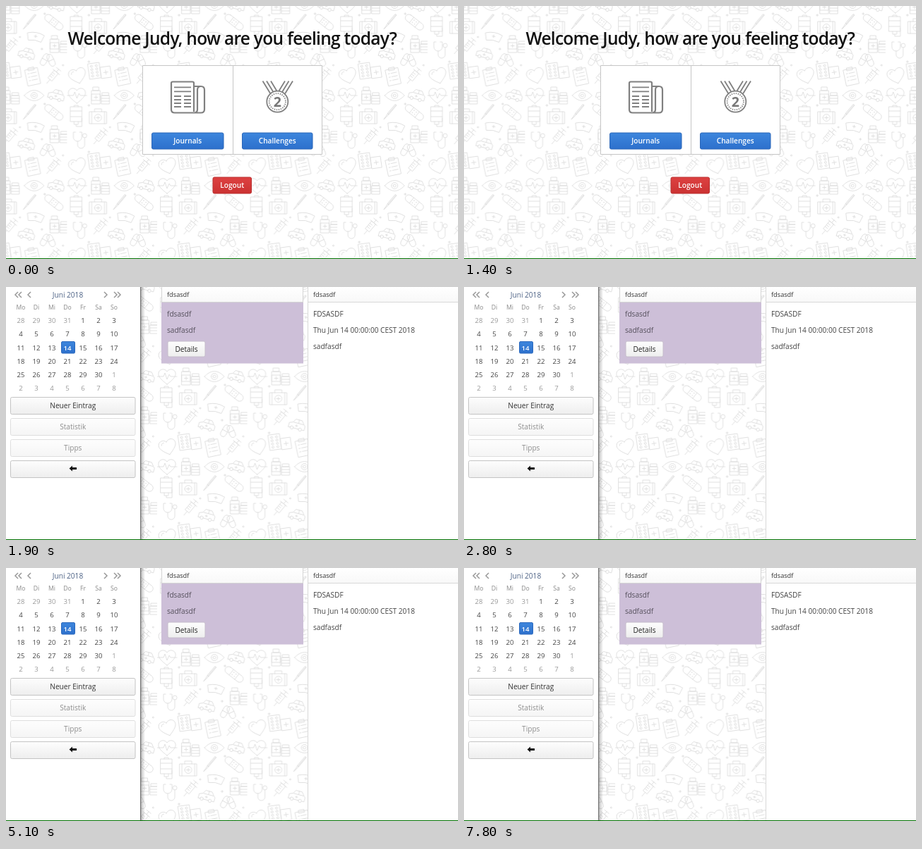
Write an HTML page that moves like this. It is 640 by 359 pixels and loops after 8100 ms.

```html
<!DOCTYPE html>
<html lang="en">
<head>
<meta charset="utf-8">
<title>Health journal</title>
<style>
html, body { margin: 0; width: 100%; height: 100%; overflow: hidden; background: #fff; }
svg { display: block; width: 640px; height: 359px; }
text { font: 10.1px "Open Sans", "Noto Sans", sans-serif; fill: #444; }
.mid { text-anchor: middle; }
.bold { font-weight: 600; }
.line { fill: none; stroke: #dadada; stroke-width: .8; stroke-linejoin: round; stroke-linecap: round; }
.icon { fill: none; stroke: #808080; stroke-width: 2.2; stroke-linejoin: round; }
.thin { stroke-width: 1.8; }
.nav { fill: none; stroke: #999; stroke-width: 1.5; }
</style>
</head>
<body>
<svg viewBox="0 0 640 359">
  <defs>
    <linearGradient id="blue" x2="0" y2="1"><stop stop-color="#3d86dd"/><stop offset="1" stop-color="#2d70cc"/></linearGradient>
    <linearGradient id="lit" x2="0" y2="1"><stop stop-color="#448de2"/><stop offset="1" stop-color="#3477d2"/></linearGradient>
    <linearGradient id="red" x2="0" y2="1"><stop stop-color="#dd4141"/><stop offset="1" stop-color="#cb3232"/></linearGradient>
    <linearGradient id="grey" x2="0" y2="1"><stop stop-color="#fdfdfd"/><stop offset="1" stop-color="#eee"/></linearGradient>
    <linearGradient id="bar" x2="0" y2="1"><stop stop-color="#fff"/><stop offset="1" stop-color="#f8f8f8"/></linearGradient>
    <linearGradient id="shade"><stop stop-color="#000" stop-opacity=".55"/><stop offset=".3" stop-color="#000" stop-opacity=".2"/><stop offset="1" stop-color="#000" stop-opacity="0"/></linearGradient>
    <pattern id="tile" x="214" y="114" width="127.6" height="128" patternUnits="userSpaceOnUse">
      <g id="doodles" class="line" transform="translate(14 13)"></g>
    </pattern>
  </defs>
  <rect width="640" height="358" fill="url(#tile)"/>

  <g id="welcome">
    <text class="mid bold" x="320.3" y="54.5" style="font-size:24.5px;letter-spacing:-.71px;fill:#111">Welcome Judy, how are you feeling today?</text>
    <path d="M193.5 84.5h254v126h-254zM321.5 84.5v126" fill="#fff" stroke="#c6c6c6"/>
    <g class="icon">
      <path d="M266 150V109.5q0-2-2-2H236q-2 0-2 2V147q0 4.5 5 4.5H276q5 0 5-5V119q0-5-5-5t-5 5v28q0 4-4 4.5M266 114h10"/>
      <path class="thin" d="M238 115.3h24M238 121.3h24M238 128h10M252 128h10M238 133h10M252 133h10M238 138h10M252 138h10M238 143h10M252 143h10"/>
    </g>
    <g class="icon thin">
      <path d="M363.5 106.5l11 18M369 106.5l11 18M375 106.5l9 15M406 106.5l-11 18M400.5 106.5l-11 18M395 106.5l-11 18"/>
      <circle cx="384.3" cy="135.7" r="15" fill="#fff"/>
      <circle cx="384.3" cy="135.7" r="11.6" stroke-dasharray="1.4 1.64"/>
    </g>
    <text class="mid" x="384.3" y="142.7" style="font-size:19.5px;font-weight:700;fill:#777">2</text>
    <g id="actions"></g>
    <g id="focus"></g>
  </g>

  <g id="journal">
    <rect x="190" width="7" height="358" fill="url(#shade)"/>
    <path d="M0 0h190v358H0z" fill="#fff"/>
    <path d="M190.5 0v358" stroke="#777"/>
    <path class="nav" d="M17 7l-4 4 4 4M22 7l-4 4 4 4M35 7l-4 4 4 4M139 7l4 4-4 4M153 7l4 4-4 4M158 7l4 4-4 4"/>
    <text class="mid" x="87.5" y="14.5" style="fill:#4d6285">Juni 2018</text>
    <g id="calendar"></g>
    <g id="menu"></g>
    <path d="M89.5 257.5l4.5-4v2.6h6v2.8h-6v2.6z" fill="#111"/>

    <path d="M220 0h201v21.5H220z" fill="url(#bar)"/>
    <path d="M220 22h201v86.5H220z" fill="#cdbfd8"/>
    <path d="M220 21.5h201M220.5 0v22M420.5 0v22" stroke="#d4d4d4"/>
    <path d="M428 0h212v358H428z" fill="#fff"/>
    <path d="M428 0h212v21.5H428z" fill="url(#bar)"/>
    <path d="M428 21.5h212M427.5 0v358" stroke="#d8d8d8"/>
    <g id="entry"></g>
  </g>
  <path d="M0 358h640v1H0z" fill="#007000"/>
</svg>
<script>
const $ = id => document.getElementById(id);
const label = (x, y, s, fill = '#444', more = '', cls = '') =>
  `<text class="${cls}" x="${x}" y="${y}" style="fill:${fill};${more}">${s}</text>`;
const button = (x, y, w, h, s, paint, edge, ink, more = '') =>
  `<rect x="${x + .5}" y="${y + .5}" width="${w - 1}" height="${h - 1}" rx="2" fill="url(#${paint})" stroke="${edge}"/>` +
  label(x + w / 2, y + h / 2 + 3.7, s, ink, more, 'mid');

// Each doodle: x, y, turn, path around its own centre
const ring = (x, y, r) => `M${x - r} ${y}a${r} ${r} 0 1 0 ${2 * r} 0a${r} ${r} 0 1 0 ${-2 * r} 0`;
const box = (x, y, w, h) => `M${x} ${y}h${w}v${h}h${-w}z`;
const plus = (x, y, r) => `M${x - r} ${y}h${2 * r}M${x} ${y - r}v${2 * r}`;
const heart = 'M0 11C-8 5-13 0-12-5C-11-11-3-12 0-7C3-12 11-11 12-5C13 0 8 5 0 11Z';
const bottles = box(-12, -7, 12, 19) + box(-10, -12, 8, 5) + box(-12, -2, 12, 9) + plus(-6, 2.5, 2.5) +
  box(2, 0, 11, 12) + box(3, -4, 9, 4) + 'M2 4h11M2 8h11';
const car = 'M-11 5v-6l5-2 3-5h9l4 5 2 2v6h-3M-8 5h-3M4 5h-8M-5-3H9M2-8v5' + ring(-6, 5, 2.3) + ring(6, 5, 2.3) + plus(0, 1, 1.5);
const syringe = box(-3.5, -7, 7, 14) + 'M-6-7H6M0-7v-5M-4-12h8M0 7v7M-3.5-3h4M-3.5 0h4M-3.5 3h4';
const capsule = 'M-4-5a4 4 0 0 1 8 0v10a4 4 0 0 1-8 0zM-4 0h8';
const blister = box(-8, -11, 16, 22) +
  [-7, -2.3, 2.3, 7].map(y => ring(-3.5, y, 1.5) + ring(3.5, y, 1.5)).join('');
const doodles = [
  [0, 0, 0, heart + 'M-14 0h9l2-5 3 9 3-7 2 3h9'],
  [33, 0, 0, bottles],
  [67, 0, 0, 'M-14 0Q0-15 14 0Q0 15-14 0Z' + ring(0, 0, 4.5) + ring(0, 0, 2)],
  [98, 0, 15, car],
  [-1, 28, 0, box(-8, -12, 16, 21) + 'M-8-6H8M-8 2H8M-3 9v4h6v-4M-3-12v-2h6v2M0 13v3h8V4'],
  [30, 30, 0, box(-12, -7, 24, 17) + 'M-5-7v-4H5v4M-9-7v17M9-7v17' + ring(0, 1.5, 5) + plus(0, 1.5, 2.5)],
  [60, 24, 40, 'M0-14v17M-1-14h2v17h-2zM-1 3L0 13l1-10'],
  [95, 24, 38, 'M-10-5h20a5 5 0 0 1 0 10h-20a5 5 0 0 1 0-10zM-5-5V5M5-5V5' + ring(-2, -2, .4) + ring(2, -2, .4) + ring(-2, 2, .4) + ring(2, 2, .4)],
  [69, 45, 10, 'M-12-4Q0-9 12-4L9 6Q0 3-9 6Z' + plus(0, -1, 2)],
  [102, 55, 0, bottles],
  [4, 62, 0, 'M-6-10h-3v7a6 6 0 0 0 12 0v-7H0M-3 3v5a5 5 0 0 0 10 0V-2' + ring(7, -5, 3)],
  [33, 58, 40, syringe],
  [56, 69, 15, car],
  [82, 77, 30, capsule],
  [91, 78, -25, capsule],
  [1, 100, -15, heart + 'M-8-4q1-4 4-3'],
  [25, 93, -8, blister],
  [41, 95, -8, box(-7, -8, 14, 16) + plus(0, 0, 3)],
  [65, 101, -12, box(-9, -11, 18, 23) + box(-4, -13, 8, 4) + 'M-6-5h2M-2-5h8M-6 0h2M-2 0h8M-6 5h2M-2 5h8'],
  [94, 100, 40, syringe],
  [17, 14, 0, plus(0, 0, 1.5)], [82, 12, 0, plus(0, 0, 1.5)], [17, 80, 0, plus(0, 0, 1.5)],
  [47, 45, 0, ring(0, 0, 1)], [78, 62, 0, plus(0, 0, 1.5)], [108, 85, 0, ring(0, 0, 1)]
];
$('doodles').innerHTML = doodles.map(([x, y, turn, d]) =>
  `<path transform="translate(${x} ${y}) rotate(${turn})" d="${d}"/>`).join('');

const strong = 'font-weight:600';
$('actions').innerHTML =
  button(206, 179.5, 102.5, 24, 'Journals', 'blue', '#2b66b8', '#fff', strong) +
  button(334, 179.5, 100.5, 24, 'Challenges', 'blue', '#2b66b8', '#fff', strong) +
  button(292.5, 242.5, 55.5, 24, 'Logout', 'red', '#b93030', '#fff', strong);
$('focus').innerHTML =
  button(205.3, 178.8, 104, 25.4, 'Journals', 'lit', '#8ab8ee', '#fff', strong);

// Month view: 28 May to 8 July
let days = ['Mo', 'Di', 'Mi', 'Do', 'Fr', 'Sa', 'So'].map((d, i) =>
  label(21 + i * 22, 32, d, '#888', 'font-size:8.6px', 'mid')).join('') +
  '<rect x="78.5" y="77.5" width="19" height="16.5" rx="1.5" fill="url(#blue)" stroke="#2a68bd"/>';
for (let i = 0; i < 42; i++) {
  const n = i - 3, inside = n > 0 && n < 31;
  const day = n < 1 ? n + 31 : inside ? n : n - 30;
  const style = n === 14 ? 'font-weight:600;font-size:9.6px' : 'font-size:9.6px';
  days += label(21 + i % 7 * 22, 51.2 + Math.floor(i / 7) * 19.2, day, n === 14 ? '#fff' : inside ? '#444' : '#999', style, 'mid');
}
$('calendar').innerHTML = days;

$('menu').innerHTML = button(6, 156, 177.5, 25, 'Neuer Eintrag', 'grey', '#c4c4c4', '#333') +
  '<g opacity=".55">' + button(6, 186, 177.5, 25, 'Statistik', 'grey', '#c4c4c4', '#333') +
  button(6, 216, 177.5, 25, 'Tipps', 'grey', '#c4c4c4', '#333') + '</g>' +
  button(6, 246, 177.5, 25, '', 'grey', '#c4c4c4', '#333');

const small = 'font-size:9.2px';
$('entry').innerHTML =
  label(228, 13.5, 'fdsasdf', '#333', small) + label(435, 13.5, 'fdsasdf', '#333', small) +
  label(228, 41.5, 'fdsasdf', '#55505c') + label(228, 65, 'sadfasdf', '#55505c') +
  button(228.5, 76.5, 54, 23, 'Details', 'grey', '#c5bccb', '#222') +
  label(435, 41.5, 'FDSASDF') + label(435, 65, 'Thu Jun 14 00:00:00 CEST 2018') + label(435, 88, 'sadfasdf');

const show = (id, on) => { $(id).style.display = on ? '' : 'none'; };
function draw() {
  const t = performance.now() % 8100;
  show('welcome', t < 1900);
  show('focus', t >= 1800);
  show('journal', t >= 1900);
  requestAnimationFrame(draw);
}
draw();
</script>
</body>
</html>
```
